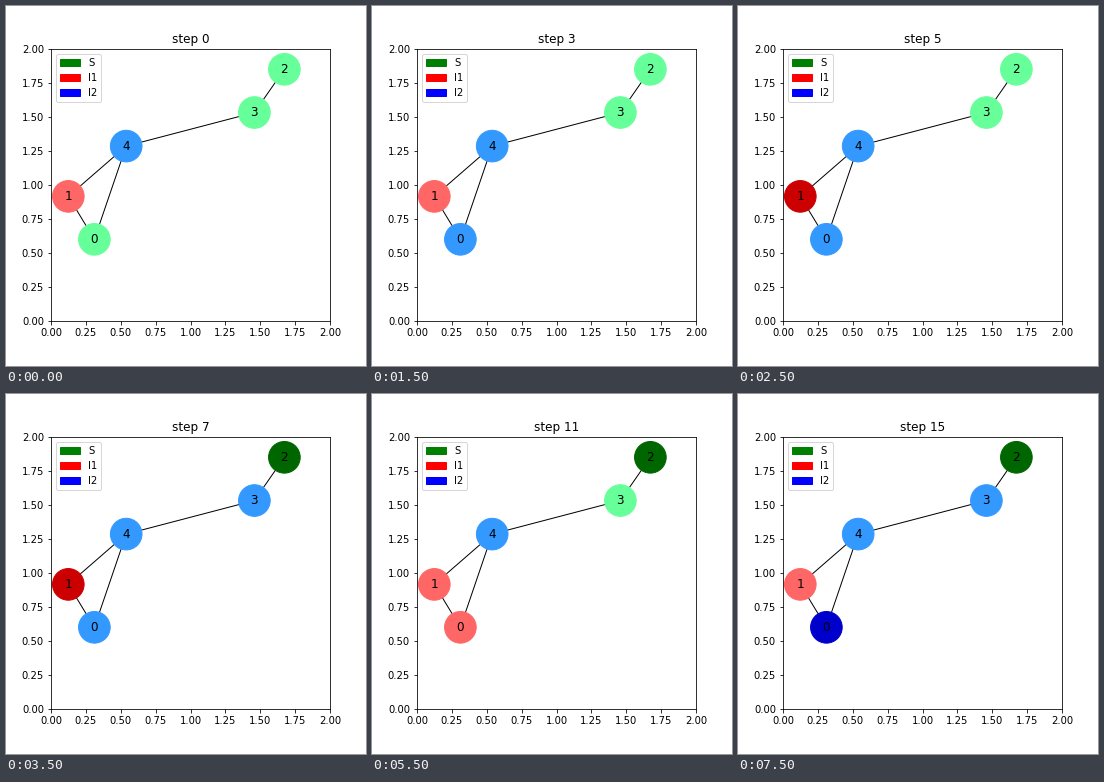
A matplotlib script for the animation above (8000 ms loop, 360 px wide and 360 px high).

```python
import matplotlib.pyplot as plt
import numpy as np
from matplotlib.animation import FuncAnimation
from matplotlib.patches import Patch

plt.rcParams.update({"font.family": "DejaVu Sans", "font.size": 10,
                     "figure.dpi": 72, "savefig.dpi": 72})

POS = np.array([(0.311, 0.601), (0.124, 0.917), (1.673, 1.852),
                (1.458, 1.534), (0.539, 1.287)])
EDGES = [(0, 1), (0, 4), (1, 4), (2, 3), (3, 4)]

# Lower case is the light shade of a state, upper case the dark one.
SHADES = {"g": "#66ff99", "G": "#006600",
          "r": "#ff6666", "R": "#cc0000",
          "b": "#3399ff", "B": "#0000cc"}

# One word per step, one letter per node.
STEPS = ("grggb brgGb brGGg brggb BrGgB bRggb bRGbb bRGbb "
         "bRGbb grGBB rrGgb rrGgb grGGb brggB BRGbb BrGbb").split()

fig = plt.figure(figsize=(5, 5), facecolor="white")
fig.subplots_adjust(left=0.125, right=0.9, bottom=0.125, top=0.88)
ax = fig.add_subplot()
ticks = np.linspace(0, 2, 9)
ax.set(xlim=(0, 2), ylim=(0, 2), xticks=ticks, yticks=ticks)

for a, b in EDGES:
    ax.plot(*POS[[a, b]].T, color="black", lw=1, zorder=1)
nodes = ax.scatter(*POS.T, s=1000, linewidths=1, zorder=2)
for i, (x, y) in enumerate(POS):
    ax.text(x, y, str(i), size=12, ha="center", va="center", zorder=3)

ax.legend(handles=[Patch(color=c, label=s) for c, s in
                   (("green", "S"), ("red", "I1"), ("blue", "I2"))],
          loc="upper left")
title = ax.set_title("", fontsize=12)


def update(step):
    nodes.set_color([SHADES[s] for s in STEPS[step]])
    title.set_text(f"step {step}")
    return nodes, title


anim = FuncAnimation(fig, update, frames=len(STEPS), interval=500,
                     repeat=True, repeat_delay=0, blit=False)
plt.show()
```
